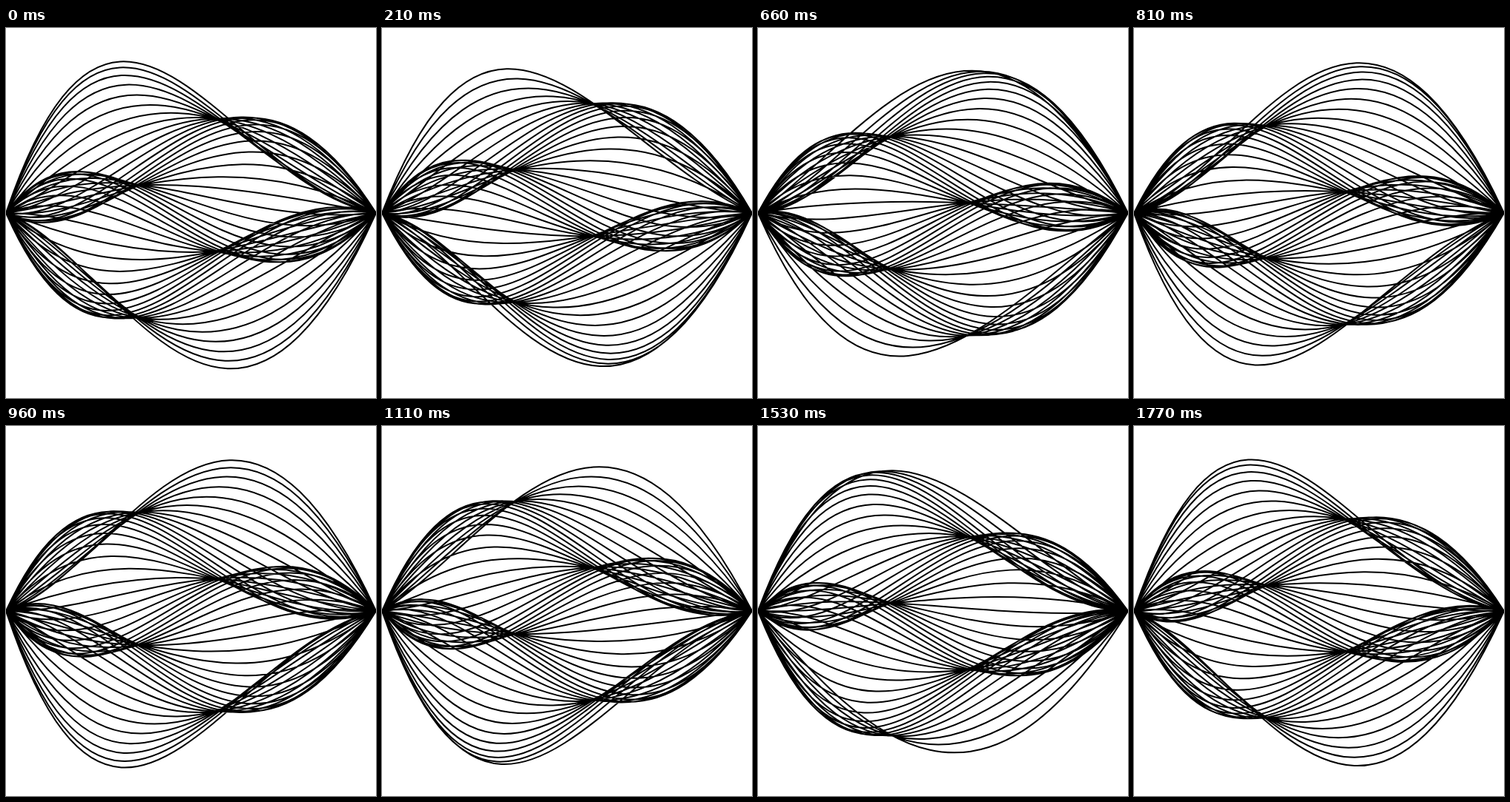
These frames come from a looping animation (500x500 px, 1.8 s). An HTML page with a canvas:

```html
<!DOCTYPE html>
<html>
<head>
<meta charset="utf-8">
<style>
  html, body { margin: 0; width: 100%; height: 100%; overflow: hidden; background: #fff; }
  canvas { display: block; }
</style>
</head>
<body>
<canvas id="stage" width="500" height="500"></canvas>
<script>
const ctx = document.getElementById('stage').getContext('2d');
const LOOP = 1800, STEP = 30;
const CURVES = 50, WAVES = 2;
const SWING = 200;  // how far the two handles move apart

function draw(turn) {
  ctx.clearRect(0, 0, 500, 500);
  ctx.lineWidth = 2;
  ctx.beginPath();
  for (let i = 0; i < CURVES; i++) {
    const y = 10 * (i + 1);
    const swing = SWING * Math.cos(2 * Math.PI * (WAVES * i / CURVES + turn));
    ctx.moveTo(0, 250);
    ctx.bezierCurveTo(150, y - swing, 300, y + swing, 500, 250);
  }
  ctx.stroke();
}

const start = performance.now();
function tick() {
  const time = (performance.now() - start) % LOOP;
  draw(Math.floor(time / STEP) * STEP / LOOP);
  requestAnimationFrame(tick);
}
tick();
</script>
</body>
</html>
```
